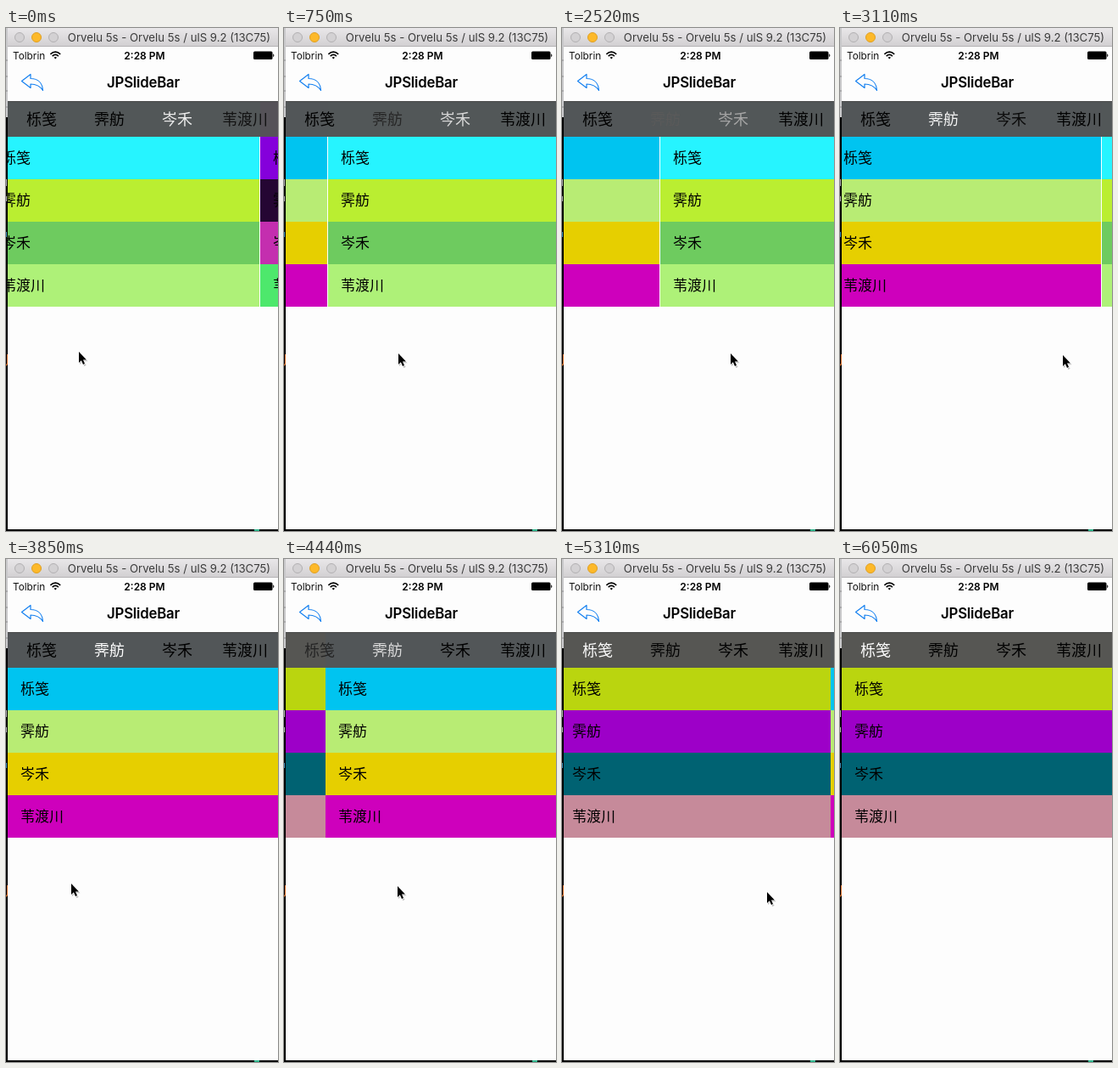
These frames come from a looping animation (321 px wide and 592 px high, 7040 ms). An HTML page:

```html
<!DOCTYPE html>
<html lang="zh-Hans">
<head>
<meta charset="utf-8">
<title>JPSlideBar</title>
<style>
  html, body { margin: 0; width: 100%; height: 100%; overflow: hidden; background: #000; }
  svg { display: block; width: 321px; height: 592px; }
  text { font-family: Inter, Roboto, sans-serif; }
  .zh text { font-family: "Noto Sans CJK SC", "Noto Sans CJK", sans-serif; }
  .mid { text-anchor: middle; }
</style>
</head>
<body>
<svg viewBox="0 0 321 592">
  <defs>
    <linearGradient id="chrome" x2="0" y2="1">
      <stop offset="0" stop-color="#e9e7e9"/>
      <stop offset="1" stop-color="#d1cfd1"/>
    </linearGradient>
    <clipPath id="screen"><path d="M2 22H321V590H2z"/></clipPath>
  </defs>

  <!-- desktop behind the window -->
  <path d="M0 0H2V105H0z" fill="#c9c9cb"/>
  <path d="M0 38H2M0 57H2M0 74H2M0 93H2" stroke="#8a8a8c"/>
  <path d="M0 178H1V186H0zM0 198H1V204H0z" fill="#b0b0b0"/>
  <path d="M0 240H1V246H0z" fill="#3a8fb8"/>
  <path d="M1 384H2V396L0 398V396L1 395z" fill="#d9722c"/>
  <path d="M293 590H299V592H293z" fill="#2fb58c"/>

  <!-- window -->
  <path d="M2 0H321V22H2z" fill="url(#chrome)"/>
  <path d="M2 21.5H321" stroke="#b4b2b4"/>
  <g stroke="#b2b0b2" fill="#d3d1d3">
    <circle cx="16" cy="11" r="5.5"/>
    <circle cx="36" cy="11" r="5.5" fill="#fdb92a" stroke="#dfa023"/>
    <circle cx="56" cy="11" r="5.5"/>
  </g>
  <text class="mid" x="192.5" y="16" font-size="13.2" fill="#3b3b3b">Orvelu 5s - Orvelu 5s / ulS 9.2 (13C75)</text>
  <path d="M2 22H321V590H2z" fill="#fdfdfd"/>

  <!-- status bar -->
  <text x="8" y="36.5" font-size="11.8" fill="#111">Tolbrin</text>
  <g fill="none" stroke="#000" stroke-width="1.7">
    <path d="M52.4 30.8Q58.3 25.4 64.2 30.8M54.7 33.1Q58.3 29.7 61.9 33.1"/>
    <path d="M56.6 34.7Q58.3 33.2 60 34.7L58.3 36.6z" fill="#000" stroke="none"/>
  </g>
  <text class="mid" x="163.5" y="36.5" font-size="12" font-weight="600">2:28 PM</text>
  <rect x="292" y="27.5" width="22.5" height="9.5" rx="1.5"/>
  <path d="M315.2 30.3Q317.6 32.2 315.2 34.2z"/>

  <!-- navigation bar -->
  <path d="M18.5 62.5L29 54.5V59.5C38 59.5 43 65 43.5 73.5C40 68 36 66 29 66V70.5z" fill="none" stroke="#1580f0" stroke-width="1.2" stroke-linejoin="round"/>
  <text class="mid" x="162" y="70" font-size="16.8" font-weight="600" letter-spacing="-.2">JPSlideBar</text>

  <g clip-path="url(#screen)" class="zh">
    <path d="M2 86H321V128H2z" fill="#545455"/>
    <g id="pages" font-size="17"></g>
    <path d="M2 86.5H321" stroke="#484949"/>
    <g id="tabs" class="mid" font-size="18"></g>
  </g>

  <g id="cursor">
    <path d="M1 2V15L4 12L6.2 17L8.6 16L6.5 11.2H10.6z" opacity=".25"/>
    <path d="M0 0V13L2.9 10.2L5 15L7 14.1L5 9.5H9z" stroke="#fff" stroke-width="1.6" paint-order="stroke" stroke-linejoin="round"/>
  </g>
</svg>
<script>
const LOOP = 7040, STEP = 147.5;      // the screen refreshes once per STEP ms
const WIDTH = 320, LEFT = 2;
const SLOP = 8, DECAY = 1.17;         // drag threshold in px, settling rate per step

const names = ['栎笺', '霁舫', '岑禾', '苇渡川'];
const palettes = [
  ['#bad50f', '#9d00c8', '#006272', '#c68a9a'],
  ['#00c4f0', '#b8ec74', '#e6cf00', '#ce00bc'],
  ['#26f4ff', '#baee31', '#6ecb5f', '#aef178'],
  ['#8500db', '#250633', '#c42eaf', '#4de86c']
];

// pointer path: [step, x, y], eased in and out between points
const path = [
  [0, 86, 381], [2, 77, 382],
  [3, 77, 382], [8.4, 267.5, 385], [10, 215, 391], [11.5, 77, 382],
  [14, 77, 382], [19, 262.7, 384], [23, 262.7, 386], [26, 77, 382],
  [27, 77, 382], [28, 79.5, 383], [33, 238, 389], [36, 242, 392], [41, 276, 600]
];
const drags = [
  { grab: 3, release: 8.4, from: 2, to: 2 },
  { grab: 14, release: 19, from: 2, to: 1 },
  { grab: 28, release: 33, from: 1, to: 0 }
];

function pointer(step) {
  const i = path.findLastIndex(point => point[0] <= step);
  const [t0, x0, y0] = path[i];
  const [t1, x1, y1] = path[i + 1] || [Infinity, x0, y0];
  const p = (1 - Math.cos(Math.PI * (step - t0) / (t1 - t0))) / 2;
  return [x0 + (x1 - x0) * p, y0 + (y1 - y0) * p];
}

function settle(page, offset, time) {
  const rest = offset * Math.exp(-DECAY * time);
  return page * WIDTH + (Math.abs(rest) < 2.2 ? 0 : rest);
}

function scrollAt(step) {
  const drag = drags.findLast(d => d.grab <= step);
  if (!drag) return settle(2, 22.5, step);
  const { grab, release, from, to } = drag;
  const pulled = pointer(Math.min(step, release))[0] - pointer(grab)[0];
  const dragged = from * WIDTH - Math.max(0, pulled - SLOP);
  return step < release ? dragged : settle(to, dragged - to * WIDTH, step - release);
}

const byId = id => document.getElementById(id);
function add(parent, tag, attrs, text = '') {
  const el = document.createElementNS('http://www.w3.org/2000/svg', tag);
  for (const key in attrs) el.setAttribute(key, attrs[key]);
  el.textContent = text;
  return parent.appendChild(el);
}
const move = (el, x, y) => el.setAttribute('transform', `translate(${x} ${y})`);

const pages = palettes.map(colors => {
  const page = add(byId('pages'), 'g', {});
  // faint tint showing through the tab bar
  add(page, 'rect', { y: 86, width: WIDTH, height: 42, fill: colors[0], opacity: .018 });
  colors.forEach((fill, row) => {
    const y = 128 + row * 50;
    add(page, 'rect', { y, width: WIDTH, height: 50, fill });
    add(page, 'text', { x: 15, y: y + 31 }, names[row]);
  });
  const gap = add(page, 'rect', { x: -1, y: 128, width: 1, height: 200, fill: '#fff' });
  return { page, gap };
});
const tabs = names.map((name, i) => add(byId('tabs'), 'text', { x: 42 + i * 80, y: 114 }, name));

function show(step) {
  const scroll = Math.round(scrollAt(step) * 2) / 2;
  pages.forEach(({ page, gap }, i) => {
    move(page, Math.ceil(LEFT + i * WIDTH - scroll), 0);
    gap.setAttribute('opacity', scroll % 1 ? 1 : 0);
    const level = Math.round(255 * Math.max(0, 1 - Math.abs(scroll / WIDTH - i)));
    tabs[i].setAttribute('fill', `rgb(${level},${level},${level})`);
  });
  move(byId('cursor'), ...pointer(step).map(Math.round));
}

const start = performance.now();
function tick() {
  show(Math.floor((performance.now() - start) % LOOP / STEP));
  requestAnimationFrame(tick);
}
tick();
</script>
</body>
</html>
```
